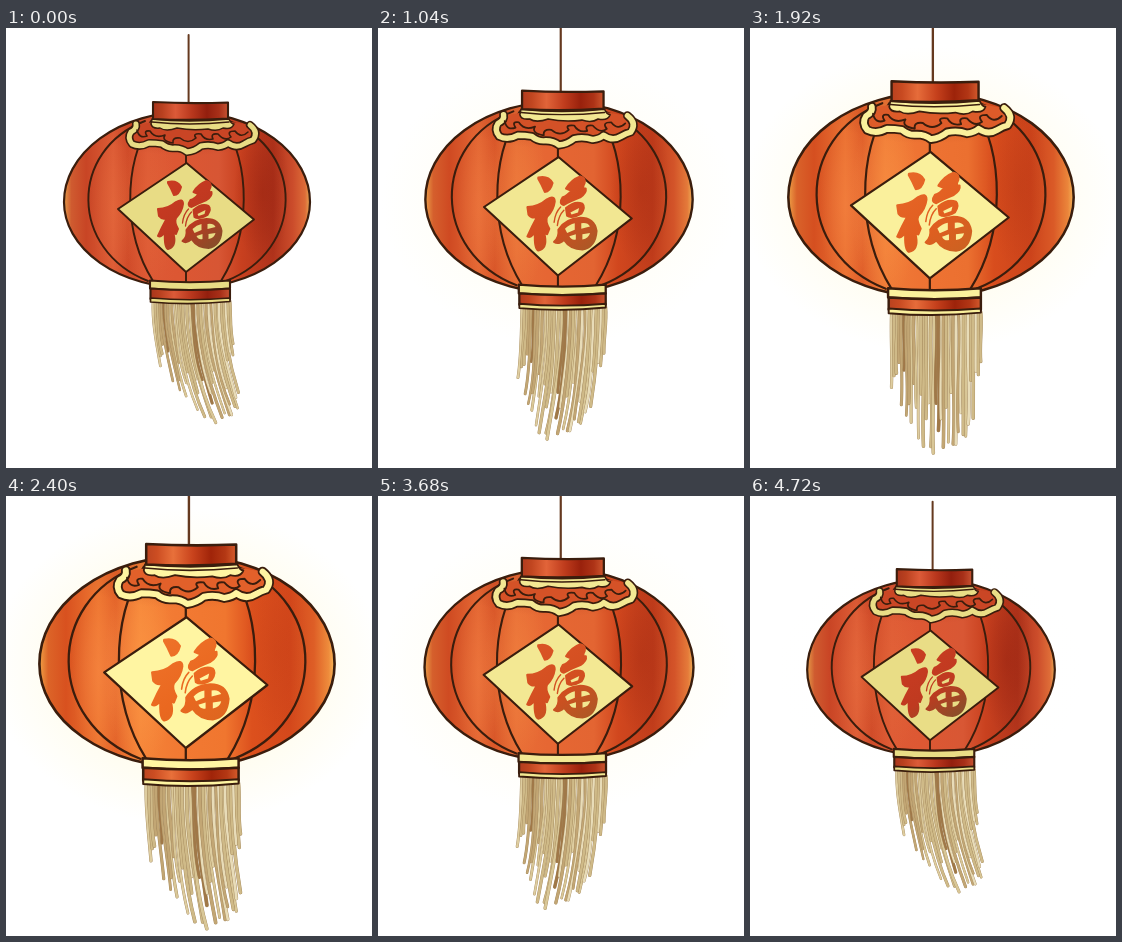
These frames come from a looping animation (366x440 px, 4800 ms). An HTML page with a canvas:

```html
<!DOCTYPE html>
<html lang="zh">
<head>
<meta charset="utf-8">
<title>Lantern</title>
<style>
html, body { margin: 0; width: 100%; height: 100%; overflow: hidden; background: #fff; }
canvas { display: block; }
</style>
</head>
<body>
<canvas id="stage" width="366" height="440"></canvas>
<script>
const ctx = document.getElementById('stage').getContext('2d');
const LOOP = 4800, STEP = 80, INK = '#3a1d0d';
const CX = 181, CY = 204;
let glow = 0; // 0 = dim, 1 = fully lit

// Colour between its dim and its lit value.
function lit(dim, bright) {
  const part = (hex, i) => parseInt(hex.substr(1 + 2 * i, 2), 16);
  return 'rgb(' + [0, 1, 2].map(i =>
    Math.round(part(dim, i) + (part(bright, i) - part(dim, i)) * glow)) + ')';
}

function across(x0, x1, stops) {
  const g = ctx.createLinearGradient(x0, 0, x1, 0);
  for (const [at, dim, bright] of stops) g.addColorStop(at, lit(dim, bright));
  return g;
}

function shape(d, fill, stroke, width = 2.1) {
  const p = new Path2D(d);
  if (fill) { ctx.fillStyle = fill; ctx.fill(p); }
  if (stroke) { ctx.strokeStyle = stroke; ctx.lineWidth = width; ctx.stroke(p); }
}

// Soft elliptical patch of light or shade.
function patch(x, y, rx, ry, rgb, alpha) {
  ctx.save();
  ctx.translate(x, y);
  ctx.scale(rx, ry);
  const g = ctx.createRadialGradient(0, 0, 0, 0, 0, 1);
  g.addColorStop(0, `rgba(${rgb},${alpha})`);
  g.addColorStop(0.5, `rgba(${rgb},${alpha * 0.6})`);
  g.addColorStop(1, `rgba(${rgb},0)`);
  ctx.fillStyle = g;
  ctx.fillRect(-1, -1, 2, 2);
  ctx.restore();
}

let seed = 11;
const random = () => (seed = seed * 16807 % 2147483647) / 2147483647;
const COUNT = 37;
const strands = Array.from({ length: COUNT }, (_, i) => {
  const x = 147 + 77 * ((i * 15) % COUNT) / (COUNT - 1);
  const reach = 64 + 60 * Math.min(1, (x - 147) / 32, (228 - x) / 16);
  return {
    x, length: reach * (1 - 0.48 * random() ** 1.6),
    width: 1.7 + random() * 0.9, bend: random() * 5 - 2.5,
    tone: ['#decda0', '#cfba88', '#e8dcb8', '#c2a674', '#d9c797', '#a07848'][Math.floor(random() * 6)]
  };
});

function drawTassel(sway) {
  for (const s of strands) {
    const dx = sway * (s.length / 122) ** 2, y = 274 + s.length;
    const d = `M${s.x} 273C${s.x + s.bend} ${273 + s.length / 3} ` +
      `${s.x + dx / 3 - s.bend} ${273 + s.length * 2 / 3} ${s.x + dx} ${y}`;
    shape(d, null, '#a3875a', s.width + 0.6);
    shape(d, null, s.tone, s.width);
  }
}

function drawBody() {
  const outline = 'M58 174A123 90 0 0 1 304 174A123 86 0 0 1 58 174Z';
  ctx.save();
  ctx.clip(new Path2D(outline));
  shape(outline, across(58, 304, [
    [0, '#e59a48', '#f0a045'], [0.03, '#cf5b30', '#dc6428'], [0.09, '#c84525', '#d8511f'],
    [0.2, '#dd5c36', '#ee7631'], [0.26, '#d04b29', '#e4642a'], [0.34, '#dd5935', '#f58438'],
    [0.46, '#dc5733', '#f27a33'], [0.63, '#d75634', '#f0762f'], [0.72, '#c8401f', '#dc501d'],
    [0.85, '#b0331b', '#d4481b'], [0.93, '#cb4c2b', '#de5e26'], [0.98, '#dd6c38', '#ee8c3c'], [1, '#e5a653', '#f7b95a']
  ]));
  patch(142, 178, 30, 85, '255,160,75', 0.1 + 0.4 * glow);
  patch(108, 180, 24, 70, '255,150,80', 0.15 + 0.2 * glow);
  patch(256, 165, 28, 72, '120,15,5', 0.28 - 0.2 * glow);
  patch(181, 98, 95, 30, '120,20,5', 0.2);
  ctx.restore();
  for (const side of [1, -1]) {
    ctx.save();
    ctx.translate(CX, 0);
    ctx.scale(side, 1);
    shape('M-34 253C-64 205 -64 138 -36 93M-39 253C-118 222 -118 122 -42 93', null, INK, 1.9);
    ctx.restore();
  }
  shape('M180 118V255', null, INK, 1.9);
  shape(outline, null, INK, 2.2);
}

function drawCollar(cream) {
  const red = lit('#c94525', '#e2602a');
  shape('M130 97Q121 103 126 114Q136 118 148 114Q160 119 181 122Q200 117 214 118Q238 122 250 109L243 97Q188 86 130 97Z', red);
  // Scalloped edge curling up at both ends.
  const edge = 'M130 96Q131 101 125 104Q121 110 126 116Q134 120 143 115Q150 115 156 116Q162 121 169 120' +
    'Q176 120 181 124Q189 123 195 118Q204 116 212 119Q219 118 222 115Q230 121 238 116Q243 113 247 112Q253 104 244 97';
  shape(edge, null, INK, 8.2);
  shape(edge, null, cream, 5);
  shape('M131 102Q133 111 141 108Q137 102 144 103Q149 111 159 107Q155 113 167 115Q166 109 174 110' +
    'Q182 117 190 110Q186 105 195 106Q199 113 207 111Q204 105 212 106Q219 114 225 109Q220 103 229 103Q235 111 242 104', null, INK, 1.6);
  shape('M146 91Q183 95 223 91Q225 96 228 96Q226 102 217 100Q211 104 202 101Q186 103 171 100' +
    'Q160 104 154 100Q146 101 145 96Z', cream, INK, 1.5);
  shape('M146 94Q183 98 223 94', null, INK, 1.3);
}

function drawFittings(cream) {
  const metal = [
    [0, '#a8341c', '#bc4420'], [0.12, '#b8401f', '#cc4d22'], [0.3, '#dc5a38', '#e8703a'],
    [0.52, '#b8371d', '#c8421c'], [0.72, '#931f0e', '#a02409'], [0.88, '#a83019', '#b43814'], [1, '#c65332', '#d65c2c']
  ];
  shape('M147 74Q184 76 222 74.5V90.5Q184 93 147 91Z', across(147, 222, metal), INK);
  shape('M144 252.5Q184 256 224 252.5V260.5Q184 263.5 144 260.5Z', cream, INK);
  shape('M144.5 260.5Q184 263.5 224 260.5V271Q184 274 144.5 271Z', across(144, 224, metal), INK);
  shape('M144.5 270Q184 273.5 224 270V273.5Q184 277.5 144.5 274Z', cream, INK, 1.7);
}

function drawFortune(cream) {
  shape('M180.5 135L248 191.5L180 244L112 181Z', cream, INK, 1.9);
  const ink = ctx.createLinearGradient(160, 155, 210, 222);
  ink.addColorStop(0, lit('#c93a22', '#ee7229'));
  ink.addColorStop(0.55, lit('#bd3820', '#ea6820'));
  ink.addColorStop(1, lit('#80502b', '#dd661f'));
  const brush = d => shape(d, ink, ink, 2);
  // Left half of the character.
  brush('M162 154Q171 152 175 159Q173 167 168 167Q165 160 162 155Z');
  brush('M152 181Q162 181 170 174Q177 170 177 176Q176 184 170 190Q168 194 172 201L170 206Q167 204 168 208' +
    'Q170 219 162 221Q158 219 159 204Q155 210 152 208Q156 199 161 190Q156 192 153 188Z');
  // Right half: roof, mouth, field.
  ctx.save();
  ctx.translate(1.5, 0);
  brush('M186 164Q191 156 199 153Q204 154 203 159Q200 165 204 164Q205 168 199 172Q189 176 184 179Q179 178 183 172Q187 171 191 166Z');
  brush('M186 182Q194 175 201 178Q204 181 200 187Q191 192 187 189Z');
  brush('M179 202Q185 192 199 191Q212 191 214 203Q213 218 201 220Q190 220 184 211Q179 216 175 213Q180 209 179 202Z');
  shape('M190 186L198 182L197 186L191 188Z', cream);
  shape('M185 201Q189 197 194 196L194 202L187 205ZM200 196Q206 195 208 199L200 201ZM189 208L195 206L195 211Q191 212 189 208Z', cream);
  shape('M201 206L208 205Q207 210 201 211Z', cream);
  shape('M181 181Q176 186 175 195M184 184Q179 189 178 198', null, ink, 1.3);
  ctx.restore();
}

function draw(time) {
  const t = Math.floor(time % LOOP / STEP) * STEP;
  const u = Math.min(t, LOOP - t); // forward, then back
  glow = u / (LOOP / 2);
  const sway = 2 + 25 * Math.cos(2 * Math.PI * u / 2640) * Math.exp(-u / 4600);
  const scale = 1 + 0.2 * glow;
  const cream = lit('#e8dc85', '#fff5a2');

  ctx.fillStyle = '#fff';
  ctx.fillRect(0, 0, 366, 440);
  ctx.save();
  ctx.translate(CX, CY);
  ctx.scale(scale, scale);
  ctx.translate(-CX, -CY);
  ctx.lineJoin = ctx.lineCap = 'round';
  patch(181, 176, 164, 132, '255,246,200', 0.65 * glow);
  shape('M182.6 7V75', null, '#65391f', 2);
  drawTassel(sway);
  drawBody();
  drawCollar(cream);
  drawFittings(cream);
  drawFortune(cream);
  ctx.restore();
}

const start = performance.now();
function tick() {
  draw(performance.now() - start);
  requestAnimationFrame(tick);
}
tick();
</script>
</body>
</html>
```
